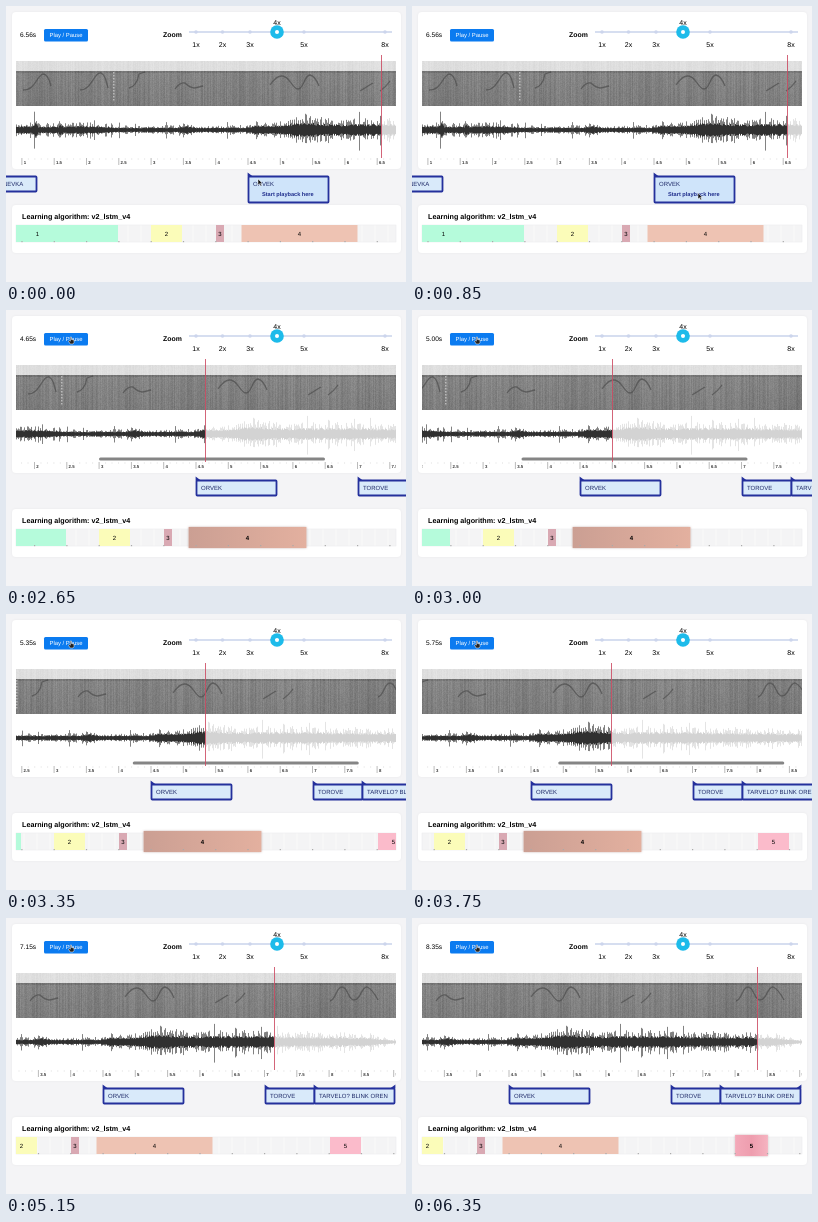
Animation of 400 by 276 pixels, one loop 6.4 s. Source, as an HTML page with a canvas:

```html
<!DOCTYPE html>
<html lang="en">
<head>
<meta charset="utf-8">
<title>Audio player</title>
<style>
  html, body { margin: 0; width: 100%; height: 100%; overflow: hidden; background: #f4f4f6; }
  #stage { position: relative; width: 400px; height: 276px; overflow: hidden; }
  .panel { position: absolute; left: 6px; width: 389px; background: #fff; border-radius: 4px; box-shadow: 0 0 3px #0000000d; }
  canvas, svg { position: absolute; }
  svg { left: 0; top: 0; }
  text { font-family: "Liberation Sans", Arial, sans-serif; font-size: 6px; text-rendering: geometricPrecision; }
  .bold { font-weight: bold; }
  .mid { text-anchor: middle; }
</style>
</head>
<body>
<div id="stage">
  <div class="panel" style="top:6px;height:157px"></div>
  <div class="panel" style="top:199px;height:48px"></div>
  <canvas id="sound" width="380" height="100" style="left:10px;top:50px"></canvas>
  <svg width="400" height="276" viewBox="0 0 400 276">
    <defs>
      <clipPath id="view"><rect x="10" y="0" width="380" height="276"/></clipPath>
      <linearGradient id="glow4"><stop stop-color="#cb9f93"/><stop offset="1" stop-color="#e3b09f"/></linearGradient>
      <linearGradient id="glow5"><stop stop-color="#f3a9b9"/><stop offset=".5" stop-color="#ee9dae"/><stop offset="1" stop-color="#f5b3c0"/></linearGradient>
      <pattern id="stripes" width="13" height="17" patternUnits="userSpaceOnUse">
        <rect width="13" height="17" fill="#f4f4f5"/><rect x="4" width="2" height="17" fill="#f7f7f7"/>
      </pattern>
    </defs>
    <text id="clock" x="14" y="31" style="font-size:6.6px"></text>
    <rect x="38" y="23" width="44" height="12.5" rx="1.5" fill="#0b7bf0"/>
    <text class="mid" x="60" y="31" fill="#fff" style="font-size:5.9px">Play / Pause</text>
    <text class="bold" x="157" y="31" style="font-size:6.9px">Zoom</text>
    <g id="zoom"><path d="M183 26H386" stroke="#d6def0" stroke-width="2"/></g>
    <g clip-path="url(#view)"><g id="ruler"></g></g>
    <rect id="thumb" y="147.5" width="226" height="3" rx="1.5" fill="#858585"/>
    <path id="playhead" d="M.5 49V152" stroke="#cc4a62" stroke-opacity=".85"/>
    <g id="labels"></g>
    <text class="bold" x="16" y="212.7" style="font-size:7.2px">Learning algorithm: v2_lstm_v4</text>
    <rect x="10" y="219" width="380" height="17" fill="url(#stripes)" stroke="#ebebed" stroke-width=".6"/>
    <g clip-path="url(#view)"><g id="blocks"></g></g>
    <g id="cursor" stroke="#fff" stroke-width=".5">
      <path id="arrow" d="M0 0V6L1.5 4.7L2.5 7L3.6 6.5L2.6 4.3H4.3Z" fill="#111"/>
      <path id="hand" d="M-.7 0H.5V2.5L3 3V5.5L2 7H-.8L-2.5 4.2L-1.7 3.5L-.7 4.2Z" fill="#222"/>
    </g>
  </svg>
</div>
<script>
const LOOP = 6400, STEP = 50, RATE = 64.6;
const START = -49, WIDTH = 585, MAX_SCROLL = 145;
const CLICK = 1150, PLAY = 2500;
const $ = id => document.getElementById(id);
const xAt = sec => 242 + (sec - 4.5) * RATE;
const clamp = (v, lo, hi) => Math.min(hi, Math.max(lo, v));
const ramp = (t, from, to) => { const p = clamp((t - from) / (to - from), 0, 1); return p * p * (3 - 2 * p); };

function add(parent, tag, attrs, content) {
  const el = document.createElementNS('http://www.w3.org/2000/svg', tag);
  for (const k in attrs) el.setAttribute(k, attrs[k]);
  if (content !== undefined) el.textContent = content;
  parent.append(el);
  return el;
}

let seed = 41;
const rand = () => (seed = (seed * 16807) % 2147483647) / 2147483647;

// Piecewise linear value through [position, ...values] points.
function along(points, p, i = 1) {
  if (p <= points[0][0]) return points[0][i];
  for (let k = 1; k < points.length; k++) {
    const a = points[k - 1], b = points[k];
    if (p <= b[0]) return a[i] + (b[i] - a[i]) * (p - a[0]) / (b[0] - a[0]);
  }
  return points[points.length - 1][i];
}

function layer(height) {
  const c = document.createElement('canvas');
  c.width = WIDTH; c.height = height;
  return c;
}

function paintSpectrogram() {
  const c = layer(45), g = c.getContext('2d');
  let drift = 0;
  for (let x = 0; x < WIDTH; x++) {
    drift = drift * .85 + (rand() - .5) * 7;
    const col = drift + (rand() - .5) * 14;
    for (let y = 0; y < 45; y++) {
      const noise = rand() - .5;
      const grey = y < 10 ? 222 + col * .4 + noise * 5 : (y < 12 ? 116 : 134 - y * .25) + col + noise * 12;
      g.fillStyle = `rgb(${grey},${grey},${grey})`;
      g.fillRect(x, y, 1, 1);
    }
  }
  g.fillStyle = '#dddddda0';
  for (let y = 11; y < 40; y += 3) g.fillRect(107 - START, y, 1.5, 1.5);
  g.translate(-START, -55);
  g.strokeStyle = '#40404090';
  g.lineWidth = 1.3;
  g.stroke(new Path2D(`M17 84C30 84 30 70 37 68Q42 68 45 80
    M74 84C86 84 88 66 95 67Q99 68 102 82 M123 82Q131 80 133 68L139 66
    M169 83Q174 76 179 77Q184 82 189 82L197 80
    M264 79Q270 70 276 70C284 70 286 83 292 83C298 83 298 69 304 69Q309 70 313 80
    M354 85L367 77 M374 85Q380 81 384 75
    M469 83C475 82 475 69 481 69C487 69 487 82 493 82C500 82 500 69 506 69Q511 71 517 82`));
  return c;
}

function paintWaves() {
  const envelope = [[-49, 6], [26, 8], [29, 16], [32, 8], [52, 7], [54, 14], [57, 7], [78, 8], [88, 8], [110, 5],
    [170, 5], [180, 8], [190, 5], [238, 5], [250, 9], [275, 9], [298, 17], [315, 13], [335, 11], [365, 12], [400, 12],
    [440, 10], [480, 10], [490, 9], [508, 9], [522, 5], [535, 3]];
  const bars = Array.from({ length: WIDTH }, (_, i) => {
    const size = along(envelope, i + START);
    const spike = size * (.35 + .65 * rand() ** 2) * (rand() > .94 ? 1.6 : 1);
    return [size * (.3 + .2 * rand()), spike, spike * (.75 + .4 * rand())];
  });
  return ['#d3d3d3', '#303030'].map(color => {
    const c = layer(50), g = c.getContext('2d');
    g.fillStyle = color;
    bars.forEach(([core, up, down], i) => {
      g.globalAlpha = .6;
      g.fillRect(i, 24 - up, 1, up + down);
      g.globalAlpha = 1;
      g.fillRect(i, 24 - core, 1, core * 2);
    });
    return c;
  });
}

const spectrogram = paintSpectrogram();
const [waveAhead, wavePlayed] = paintWaves();
const sound = $('sound').getContext('2d');

function drawSound(scroll, headX) {
  const x = START - 10 - scroll;
  const split = clamp(headX - 10, 0, 380);
  sound.clearRect(0, 0, 380, 100);
  sound.drawImage(spectrogram, x, 5);
  sound.drawImage(waveAhead, x, 50);
  sound.clearRect(0, 50, split, 50);
  sound.save();
  sound.beginPath();
  sound.rect(0, 50, split, 50);
  sound.clip();
  sound.drawImage(wavePlayed, x, 50);
  sound.restore();
}

[[190, '1x'], [216.5, '2x'], [244, '3x'], [271, '4x'], [298, '5x'], [379, '8x']].forEach(([x, name]) => {
  const active = name === '4x';
  add($('zoom'), 'circle', { cx: x, cy: 26, r: active ? 6.8 : 1.8, fill: active ? '#1dbbea' : '#ccd5ec' });
  if (active) add($('zoom'), 'circle', { cx: x, cy: 26, r: 2, fill: '#fff' });
  add($('zoom'), 'text', { x, y: active ? 18.5 : 41, class: 'mid', style: 'font-size:7px' }, name);
});

for (let n = 0; n <= 90; n++) {
  const x = xAt(n / 10), major = n % 5 === 0;
  add($('ruler'), 'path', { d: `M${x} 152V${major ? 159 : 154}`, stroke: major ? '#777' : '#ddd', 'stroke-width': .5 });
  if (major) add($('ruler'), 'text', { x: x + 1.8, y: 157.9, class: 'bold', style: 'font-size:4.3px', fill: '#333' }, n / 10);
}

// Content x, text inset, name.
const labels = [[-50, 47, 'NEVKA'], [242, 5, 'ORVEK'], [404, 5, 'TOROVE'], [453, 5, 'TARVELO? BLINK OREN']].map(([x, inset, name], i, all) => {
  const g = add($('labels'), 'g', { transform: `translate(${x} 170.5)` });
  const next = i + 1 < all.length ? all[i + 1][0] : Infinity;
  const box = add(g, 'rect', { x: .5, y: 0, width: Math.min(80, next - x), height: 15, rx: .8, stroke: '#24309c', 'stroke-width': 1.8 });
  add(g, 'path', { d: 'M-.4 -4L5 0H-.4Z', fill: '#24309c' });
  add(g, 'text', { x: inset, y: 9.2, fill: '#1c2766' }, name);
  return { g, box };
});
add(labels[3].g, 'path', { d: 'M81.4 -4L76 0H81.4Z', fill: '#24309c' });
const target = labels[1];
const hint = add(target.g, 'text', { x: 14, y: 19.8, class: 'bold', style: 'font-size:5.6px', fill: '#1f2d8c' }, 'Start playback here');

const blocks = [[-49, 112, '#b5fbdb'], [145, 176, '#fbfcb9'], [210, 218, '#d9a9b3'], [235.5, 351.5, '#eec3b3'], [469, 500, '#fbbbcb']]
  .map(([from, to, fill], i) => {
    const mid = (from + to) / 2, w = to - from;
    const g = add($('blocks'), 'g', { transform: `translate(${mid} 227.5)` });
    const body = add(g, 'g', {});
    const shape = { x: -w / 2, y: -8.5, width: w, height: 17 };
    add(body, 'rect', { ...shape, fill });
    const glow = i > 2 && add(body, 'rect', { ...shape, fill: `url(#glow${i + 1})`, opacity: 0 });
    const name = add(g, 'text', { x: 0, y: 2, class: 'mid' }, i + 1);
    return { body, glow, name, w };
  });
for (let n = 0; n <= 18; n++) add($('blocks'), 'rect', { x: xAt(n / 2) - .5, y: 235, width: 1.2, height: 1.2, fill: '#aaa' });

function highlight({ body, glow, name, w }, amount) {
  body.setAttribute('transform', `scale(${1 + amount * 1.5 / w} ${1 + amount * .24})`);
  body.style.filter = amount ? `blur(${.5 * amount}px) drop-shadow(0 0 ${amount}px rgba(90,60,60,${.3 * amount}))` : 'none';
  glow.setAttribute('opacity', amount);
  name.style.fontWeight = amount > .5 ? 'bold' : 'normal';
}

const cursorPath = [[0, 252, 173], [350, 254, 184], [650, 254, 184], [850, 286, 187], [1250, 286, 187],
  [1450, 222, 133], [1650, 146, 76], [1900, 92, 46], [2200, 65, 27]];

function render(t) {
  const sec = t < CLICK ? 6.56 : t < PLAY ? 4.5 : 2 + t / 1000;
  const playing = t >= PLAY;
  const scroll = playing ? Math.round(clamp(xAt(sec) - 200, 0, MAX_SCROLL)) : 0;
  const headX = Math.floor(xAt(sec) - scroll);
  drawSound(scroll, headX);
  $('clock').textContent = sec.toFixed(2) + 's';
  $('playhead').setAttribute('transform', `translate(${headX})`);
  for (const id of ['ruler', 'labels', 'blocks']) $(id).setAttribute('transform', `translate(${-scroll})`);

  $('thumb').setAttribute('x', 10 + (58.7 + scroll) * .75);
  $('thumb').setAttribute('opacity', playing ? 1 - ramp(t, 4600, 4850) : 0);
  highlight(blocks[3], ramp(t, CLICK, CLICK + 500) * (1 - ramp(t, 4200, 4600)));
  highlight(blocks[4], ramp(t, 6000, 6350));

  const x = along(cursorPath, t), y = along(cursorPath, t, 2);
  const hover = y > 170;
  for (const { box } of labels) box.setAttribute('fill', '#d9eafa');
  target.box.setAttribute('height', hover ? 26 : 15);
  if (hover) target.box.setAttribute('fill', '#cfe4fa');
  hint.setAttribute('opacity', hover ? 1 : 0);
  $('cursor').setAttribute('transform', `translate(${x} ${y})`);
  const onButton = x < 82 && y < 36;
  $('hand').setAttribute('opacity', onButton ? 1 : 0);
  $('arrow').setAttribute('opacity', onButton ? 0 : 1);
}

const began = performance.now();
function tick() {
  const t = (performance.now() - began) % LOOP;
  render(Math.floor(t / STEP) * STEP);
  requestAnimationFrame(tick);
}
tick();
</script>
</body>
</html>
```
